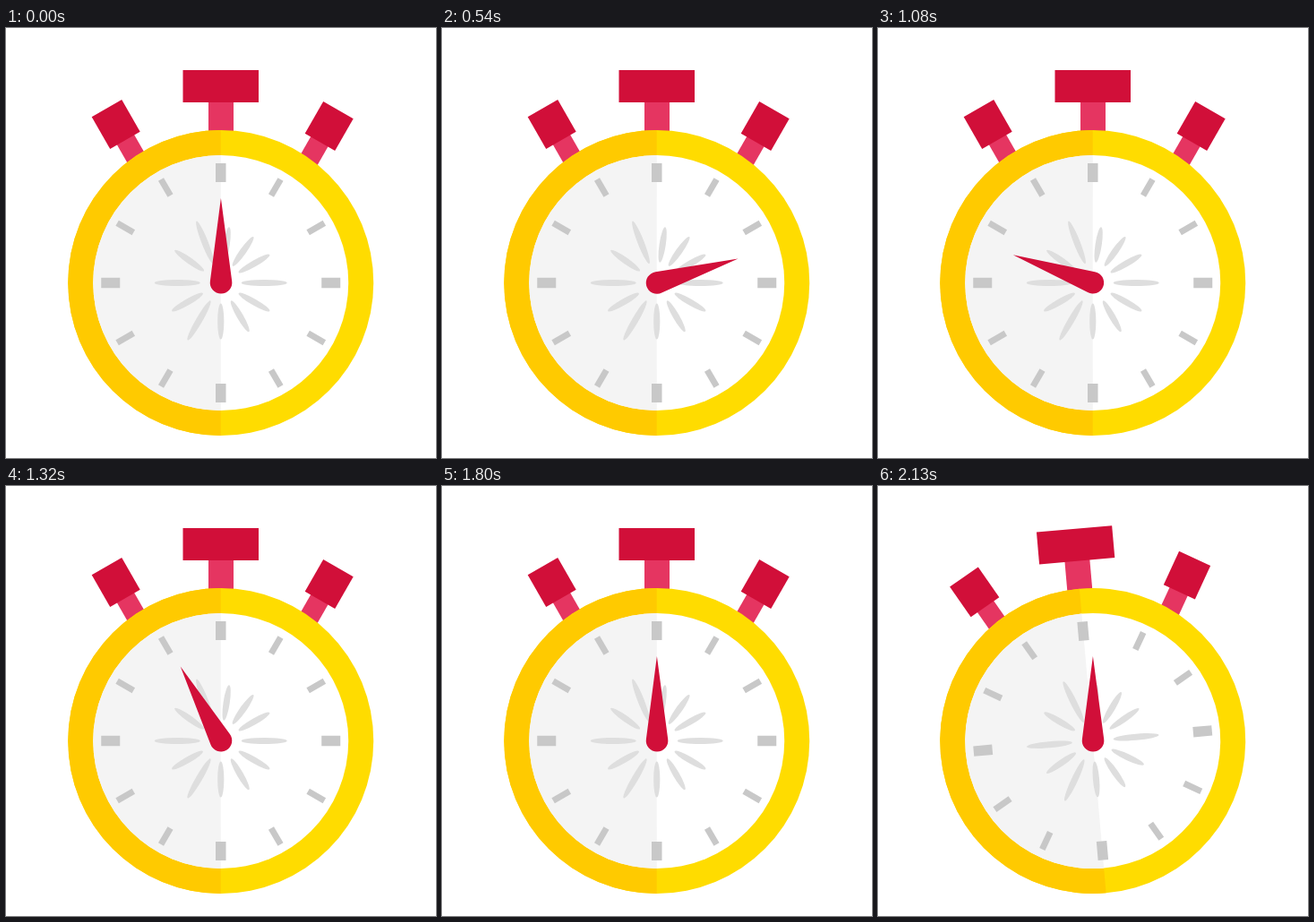
An HTML page for the animation above (2160 ms loop, 480 px wide and 480 px high).

```html
<!DOCTYPE html>
<html>
<head>
<meta charset="utf-8">
<title>Stopwatch</title>
<style>
html, body { margin: 0; width: 100%; height: 100%; overflow: hidden; background: #fff; }
svg { display: block; width: 100vw; height: 100vh; }
</style>
</head>
<body>
<svg viewBox="0 0 480 480">
  <g id="body">
    <g id="buttons">
      <path fill="#e53561" d="M226 80h28v45h-28z"/>
      <path fill="#d10f39" d="M197.5 47h84.5v36h-84.5z"/>
    </g>
    <circle cx="239.75" cy="284.5" r="170.5" fill="#ffdc00"/>
    <path fill="#ffca00" d="M239.75 114a170.5 170.5 0 0 0 0 341z"/>
    <circle cx="239.75" cy="284.5" r="142.5" fill="#fff"/>
    <path fill="#f4f4f4" d="M239.75 142a142.5 142.5 0 0 0 0 285z"/>
    <g id="marks" transform="translate(239.75 284.5)"></g>
  </g>
  <path id="hand" fill="#d10f39" d="M0-94.5L12.3-2A12.3 12.3 0 1 1-12-2z"/>
</svg>
<script>
const LOOP = 2160, STEP = 30, SPIN = 1800, SHAKE = 120;
const $ = id => document.getElementById(id);
const add = (id, markup) => $(id).insertAdjacentHTML('beforeend', markup);

// Mirrored side buttons
for (const side of [-1, 1])
  add('buttons', `<g transform="translate(${241.7 + side * 119} ${108.5 + side}) rotate(${side * 29.8}) scale(${side} 1)">
    <path fill="#e53561" d="M-12 18h22.3v36h-22.3z"/>
    <path fill="#d10f39" d="M-19.3-20.6h38.6v41.2h-38.6z"/></g>`);

// Twelve ticks, and twelve petals that lean clockwise in the upper half
for (let i = 0; i < 12; i++) {
  const w = i % 3 ? 7 : 11.5;
  const tip = i % 4 && i % 6 ? 63 : 74, root = 23;
  const lean = i > 6 ? 9 * Math.sin((i - 6) / 5 * Math.PI) : 0;
  add('marks', `<rect x="${-w / 2}" y="-133.5" width="${w}" height="21" fill="#c8c8c8"
      transform="rotate(${i * 30})"/>
    <ellipse cx="${(tip + root) / 2}" rx="${(tip - root) / 2}" ry="3.6" fill="#dedede"
      transform="rotate(${i * 30 + lean})"/>`);
}

const cubic = (a, b, s) => 3 * a * s * (1 - s) ** 2 + 3 * b * s * s * (1 - s) + s ** 3;

// Cubic-bezier easing solved by bisection
function ease(t) {
  let lo = 0, hi = 1;
  for (let i = 0; i < 30; i++) {
    const mid = (lo + hi) / 2;
    if (cubic(.167, .236, mid) < t) lo = mid; else hi = mid;
  }
  return cubic(.167, 1, lo);
}

function draw(now) {
  const t = Math.floor((now % LOOP) / STEP + .01) * STEP % LOOP;
  const turn = t < SPIN ? 720 * ease(t / SPIN) : 0;
  const shake = t > SPIN ? 5 * Math.sin((t - SPIN) / SHAKE * 2 * Math.PI) : 0;
  $('hand').setAttribute('transform', `translate(239.9 284.4) rotate(${turn})`);
  $('body').setAttribute('transform', `rotate(${shake} 239.75 284.5)`);
}

const start = performance.now();
function tick() {
  draw(performance.now() - start);
  requestAnimationFrame(tick);
}
tick();
</script>
</body>
</html>
```
